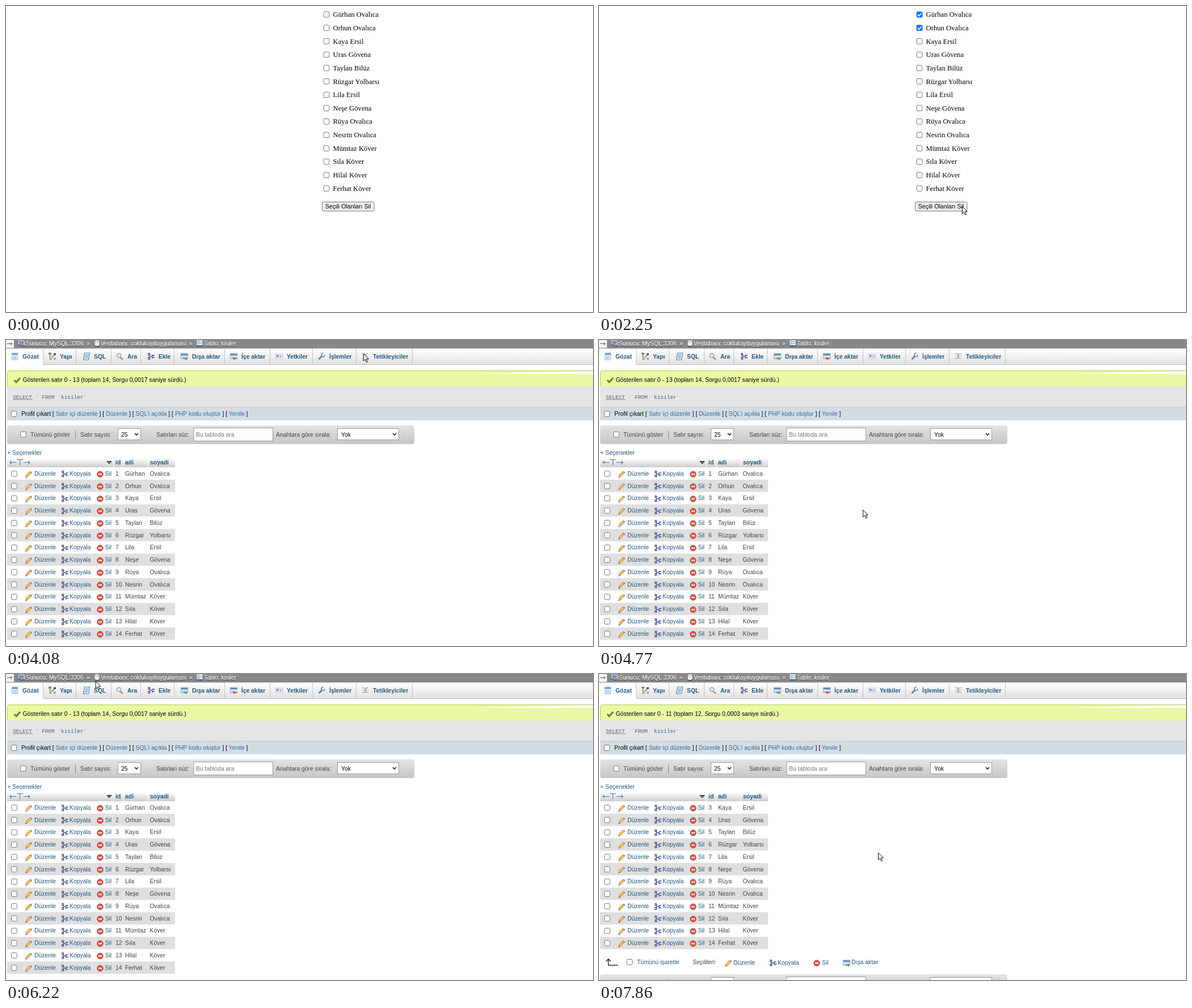
Recreate the animation shown at these times as an HTML page. Size 1035 px wide and 541 px high, loop 8000 ms.

```html
<!DOCTYPE html>
<html lang="tr">
<head>
<meta charset="utf-8">
<style>
  html, body { margin: 0; width: 100%; height: 100%; overflow: hidden; background: #fff; }
  svg { display: block; }
  text { font: 10.4px "Liberation Sans", Arial, sans-serif; white-space: pre; fill: #444; }
  .name { font: 12.7px "Liberation Serif", "Times New Roman", serif; fill: #000; }
  .button { font-size: 10.67px; text-anchor: middle; fill: #000; }
  .link { fill: #235a81; }
  .action { fill: #2f6fa3; }
  .bold { font-weight: bold; fill: #235a81; }
  .black { fill: #000; }
  .hint { fill: #757575; }
  .italic { font-style: italic; }
  .code { font: 9.45px "Liberation Mono", "Courier New", monospace; fill: #6a5a72; }
  .crumbs { filter: drop-shadow(0 1px 0 #222); }
  .crumbs text { fill: #fff; stroke: #fff; stroke-width: .25px; }
</style>
</head>
<body>
<svg id="stage" width="1035" height="541" viewBox="0 0 1035 541"></svg>
<script>
const LOOP = 8000;
const people = [
  'Gürhan Ovalıca', 'Orhun Ovalıca', 'Kaya Ersil', 'Uras Gövena', 'Taylan Bilüz',
  'Rüzgar Yolbarsı', 'Lila Ersil', 'Neşe Gövena', 'Rüya Ovalıca', 'Nesrin Ovalıca',
  'Mümtaz Köver', 'Sıla Köver', 'Hilal Köver', 'Ferhat Köver'
];

const text = (x, y, s, cls = '') => `<text x="${x}" y="${y}" class="${cls}">${s}</text>`;
const rect = (x, y, w, h, fill, more = '') =>
  `<rect x="${x}" y="${y}" width="${w}" height="${h}" fill="${fill}" ${more}/>`;
const path = (d, stroke, width = 1, fill = 'none') =>
  `<path d="${d}" stroke="${stroke}" stroke-width="${width}" fill="${fill}"/>`;
const at = (x, y, body) => `<g transform="translate(${x} ${y})">${body}</g>`;
const checkbox = (x, y) => rect(x - 4.8, y - 4.8, 9.6, 9.6, '#fff', 'rx="1.8" stroke="#767676"');
const field = (x, y, w, h) => rect(x, y, w, h, '#fff', 'stroke="#9a9a9a"');
const chevron = (x, y) => path(`M${x - 3} ${y - 1.5}l3 3 3-3`, '#222', 1.7);

const page = rect(1.5, .5, 10, 12, '#fff', 'stroke="#8fb3d9"');
const sheet = rect(.5, 1.5, 12, 9, '#fff', 'stroke="#8a9fb5"') + rect(1, 2, 11, 3, '#4f86c0') +
  path('M2 7.5h9M2 9h9', '#9ab');
const icons = {
  browse: page + rect(2, 1, 9, 3, '#5b93d3') + path('M3 6.5h7M3 8.5h7M3 10.5h7', '#86abd6'),
  structure: path('M2.5 2v10M2.5 11.5h3', '#555') + path('M5 9l6-6', '#7aa35a', 2) +
    rect(0, 0, 5, 3, '#777') + rect(9, 1, 4, 3, '#444') + rect(9, 9, 4, 3, '#999'),
  sql: path('M3.5 .5h9l-2 12h-9z', '#4d84c4', 1.2, '#e3eefa') + path('M5 4h5M4.5 6.5h5M4 9h5', '#4d84c4'),
  search: path('M7 8l5 4', '#c98a35', 2.4) + '<circle cx="5" cy="5" r="3.7" fill="#dbe9f7" stroke="#8ba0b5" stroke-width="1.3"/>',
  insert: path('M1 1.5h4M1 4h3M1 8.5h3M1 11h4', '#444', 1.5) + path('M4.5 1v11M9 3.5v7M4 6.5h6', '#5a60b8', 1.6) +
    path('M10 4.5h3M10 8.5h3', '#555', 1.4),
  export: sheet + path('M5 10.5h6m-2-2l2 2-2 2', '#3f9a3f', 1.5),
  import: sheet + path('M12 10.5h-6m2-2l-2 2 2 2', '#c8483c', 1.5),
  rights: rect(.5, 2.5, 12, 8, '#f4f7fb', 'stroke="#b8c6d6"') + rect(2, 4, 3.5, 4, '#5b93d3') +
    path('M7 5.5h4M7 7.5h4', '#888'),
  wrench: path('M1.5 11.5l6-6', '#4f80b8', 2.8) + path('M9.5 1a3 3 0 1 0 2.5 3', '#8092a5', 2),
  triggers: path('M1 2h4l3 8h4M1 10h4l3-8h4', '#999', 1.2) + path('M1 6h11', '#bbb'),
  pencil: path('M2 10.5l7.5-7.5', '#c77c1c', 4.2) + path('M2.5 10l7-7', '#ffd375', 2.2) +
    path('M9 2l2.5 2.5', '#b8705a', 2) + path('M.5 12.2l2-.7', '#333', 1.5),
  remove: '<circle cx="6" cy="6.7" r="5.2" fill="#dd5948" stroke="#b63c2f"/>' + path('M3 6.7h6', '#fff', 2),
  server: rect(.5, 1.5, 9, 6, '#5e95ce', 'stroke="#ddd"') + path('M3 9.5h6M6 8v2', '#ddd') + rect(9, 3, 3, 7, '#bbb'),
  database: path('M.5 2v7c0 2 8 2 8 0V2c0-2-8-2-8 0c0 2 8 2 8 0', '#aaa', 1, '#eee'),
  table: rect(.5, .5, 10, 9, '#eef4fb', 'stroke="#9ab8da"') + path('M1 3.5h9M1 6.5h9M4 1v8', '#7aa3d3')
};
const icon = (name, x, y) => at(x, y, icons[name]);

function listScene(skip) {
  const shown = people.slice(skip), pitch = 23.66;
  const rows = shown.map((name, i) =>
    checkbox(565, 15 + pitch * i) + text(576.5, 19.2 + pitch * i, name, 'name')).join('');
  const y = 354.5 - pitch * skip;
  return rows + rect(557.5, y - 8, 91.5, 16, '#efefef', 'rx="1.8" stroke="#767676"') +
    text(603, y + 3.8, 'Seçili Olanları Sil', 'button');
}

const tick = i => `<g class="tick">${rect(560, 10 + 23.66 * i, 10.4, 10.4, '#0075ff', 'rx="2"')}` +
  path(`M562 ${15.3 + 23.66 * i}l2.3 2.4 4-5`, '#fff', 1.7) + '</g>';

const navBar = y => at(0, y,
  rect(2, 0, 718, 33, 'url(#bar)', 'rx="4"') + checkbox(30.5, 16) + text(43, 19.7, 'Tümünü göster') +
  path('M122.5 9v15', '#6f8fa8') + text(131, 19.7, 'Satır sayısı:') +
  field(197.5, 5.5, 40, 20) + text(203, 19.7, '25', 'black') + chevron(230, 15.5) +
  text(265, 19.7, 'Satırları süz:') + field(331, 4.5, 139.5, 23) + text(335, 19.7, 'Bu tabloda ara', 'hint') +
  text(476, 19.7, 'Anahtara göre sırala:') + field(584.5, 5.5, 108, 20) +
  text(591, 19.7, 'Yok', 'black') + chevron(685, 15.5));

function header(count, seconds) {
  const crumbs = icon('server', 22, 0) + text(35, 9.5, 'Sunucu: MySQL:3306') + text(142, 9.5, '»') +
    icon('database', 156, 0) + text(167, 9.5, 'Veritabanı: coklukayituygulamasi') + text(323, 9.5, '»') +
    icon('table', 336, 0) + text(349, 9.5, 'Tablo: kisiler');
  const tabs = [
    ['browse', 29, 'Gözat', 65.5], ['structure', 95, 'Yapı', 123.5], ['sql', 155, 'SQL', 185.5],
    ['search', 214, 'Ara', 237.5], ['insert', 269, 'Ekle', 296.5], ['export', 328, 'Dışa aktar', 385.5],
    ['import', 415, 'İçe aktar', 465.5], ['rights', 495, 'Yetkiler', 540.5],
    ['wrench', 570, 'İşlemler', 617.5], ['triggers', 647, 'Tetikleyiciler', 716.5]
  ].map(([name, x, label, edge]) => icon(name, x - 20, 22.5) + text(x, 32.5, label, 'bold') +
    path(`M${edge} 15v28`, '#c4c4c4')).join('');
  const links = ['Satır içi düzenle', 'Düzenle', 'SQL’i açıkla', 'PHP kodu oluştur', 'Yenile']
    .map(s => `[ <tspan class="action">${s}</tspan> ]`).join(' ');
  return rect(0, 0, 1035, 15, '#888') + rect(0, 0, 14, 14, '#f4f4f4') + path('M2 6.5h9m-3-2.5l3 2.5-3 2.5', '#555') +
    `<g class="crumbs">${crumbs}</g>` +
    rect(0, 15, 1035, 29, 'url(#tabs)') + rect(0, 15, 65, 29, '#fff') + path('M66 43.5H1035', '#bbb') + tabs +
    path('M2.5 82V58q0-3.5 4-3.5H1035', '#a2d246', 1, '#ebf8a4') + rect(3, 60, 1032, 22, '#ebf8a4') +
    path('M14.5 71l3.5 3.5 7-7.5', '#66802c', 3) +
    text(29.5, 74, `Gösterilen satır 0 - ${count - 1} (toplam ${count}, Sorgu ${seconds} saniye sürdü.)`, 'black') +
    rect(2, 82, 1033, 37, '#e5e5e5') + path('M12 105.5h35', '#888') +
    text(12, 103.5, 'SELECT <tspan fill="#d0d0d0">*</tspan> FROM <tspan fill="#2f6478">`kisiler`</tspan>', 'code') +
    path('M2 118.5H1035', '#c3cbd1') + rect(2, 119, 1033, 23, '#d3dce3') + checkbox(14, 130.5) +
    text(27, 134.2, 'Profil çıkart ' + links, 'black');
}

// Edit, copy and delete links; xs holds icon and label positions
const actions = (xs, y) => ['pencil', 'insert', 'remove'].map((name, i) =>
  icon(name, xs[2 * i], y - 5.5) + text(xs[2 * i + 1], y + 3.7, ['Düzenle', 'Kopyala', 'Sil'][i], 'link')).join('');

function tableScene(skip, seconds) {
  const shown = people.slice(skip), pitch = 21.77, top = 225.2;
  const heads = [[2, 187], [190, 16], [207, 42.5], [250.5, 47.5]]
    .map(([x, w]) => rect(x, 209, w, 16, 'url(#head)')).join('') +
    path('M12 216.5h-5m2.5-2.5l-2.5 2.5 2.5 2.5M37 216.5h5m-2.5-2.5l2.5 2.5-2.5 2.5M12 216.5h6M31 216.5h6M19 211.5h11M24.5 211.5v10', '#5a68b8', 1.1) +
    path('M178 214.5h8l-4 4.5z', '#222', 1, '#777') +
    text(193, 220, 'id', 'bold') + text(210, 220, 'adi', 'bold') + text(254, 220, 'soyadi', 'bold');
  const rows = shown.map((name, i) => {
    const [first, last] = name.split(' '), y = top + pitch * (i + .5);
    return (i % 2 ? rect(2, y - pitch / 2, 296, pitch, '#dfdfdf') : '') + checkbox(14.5, y + .3) +
      actions([34, 50, 97, 112, 160, 174.5], y) +
      text(193, y + 3.7, i + skip + 1) + text(210, y + 3.7, first) + text(253.5, y + 3.7, last);
  }).join('');
  const end = top + pitch * shown.length;
  const footer = at(0, end,
    path('M33.5 28.5H16.5V18M12.5 21.5l4-4 4 4', '#111', 1.3) + checkbox(54, 22.8) +
    text(67, 27, 'Tümünü işaretle', 'link') + text(165, 27, 'Seçilileri:', 'italic') +
    actions([222, 237, 300, 315, 378, 393], 23.5) + icon('export', 430, 18) + text(445, 27, 'Dışa aktar', 'link'));
  return header(shown.length, seconds) + navBar(151) + text(2, 203, '+ Seçenekler', 'link') +
    heads + rows + footer + navBar(end + 44.5);
}

const gradient = (id, from, to) => `<linearGradient id="${id}" x2="0" y2="1"><stop stop-color="${from}"/>` +
  `<stop offset="1" stop-color="${to}"/></linearGradient>`;
const stage = document.getElementById('stage');
stage.innerHTML = '<defs>' + gradient('tabs', '#fff', '#e0e0e0') + gradient('bar', '#e3e3e3', '#c6c6c6') +
  gradient('head', '#fff', '#ccc') + '</defs>' +
  [listScene(0) + tick(0) + tick(1), listScene(2), tableScene(0, '0,0017'), tableScene(2, '0,0003')]
    .map(s => `<g class="scene">${s}</g>`).join('') +
  '<g id="cursor">' + path('M.5 .5V13l2.9-2.7 2.2 4.9 2-.9-2.2-4.8h4z', '#111', 1, '#fff') + '</g>';

const scenes = stage.querySelectorAll('.scene');
const ticks = stage.querySelectorAll('.tick');
const cursor = document.getElementById('cursor');

// Cursor stops: time, x, y (off stage when hidden)
const stops = [
  [0, 960, 560], [129, 960, 560], [130, 960, 508], [900, 561, 12], [1040, 562, 12],
  [1310, 562, 35], [1510, 562, 35], [1900, 610, 404], [2250, 640, 354], [2320, 640, 354],
  [2700, 691, 350], [3050, 636, 348], [3120, 636, 348], [3610, 812, 16], [3670, 830, -20],
  [4060, 632, -20], [4080, 630, 24], [4770, 465, 300], [4840, 465, 303], [5150, 450, 363],
  [5600, 407, 186], [5680, 407, 186], [5950, 140, 45], [6050, 100, -20], [6150, 120, -20],
  [6500, 471, 284], [6830, 486, 305], [7030, 486, 305], [7310, 484, 296], [7380, 484, 296],
  [7790, 492, 312], [7860, 492, 315.5], [LOOP, 492, 315.5]
];

function cursorAt(t) {
  const i = stops.findIndex(s => s[0] > t);
  const [t0, x0, y0] = stops[i - 1], [t1, x1, y1] = stops[i];
  const p = (t - t0) / (t1 - t0), e = p * p * (3 - 2 * p);
  return [x0 + (x1 - x0) * e, y0 + (y1 - y0) * e];
}

function draw(now) {
  const t = now % LOOP;
  const current = t < 2650 ? 0 : t < 3880 ? 1 : t < 7590 ? 2 : 3;
  scenes.forEach((s, i) => s.style.display = i === current ? '' : 'none');
  ticks.forEach((s, i) => s.style.display = t >= [970, 1510][i] ? '' : 'none');
  cursor.setAttribute('transform', `translate(${cursorAt(t)})`);
  requestAnimationFrame(() => draw(performance.now()));
}
draw(0);
</script>
</body>
</html>
```
